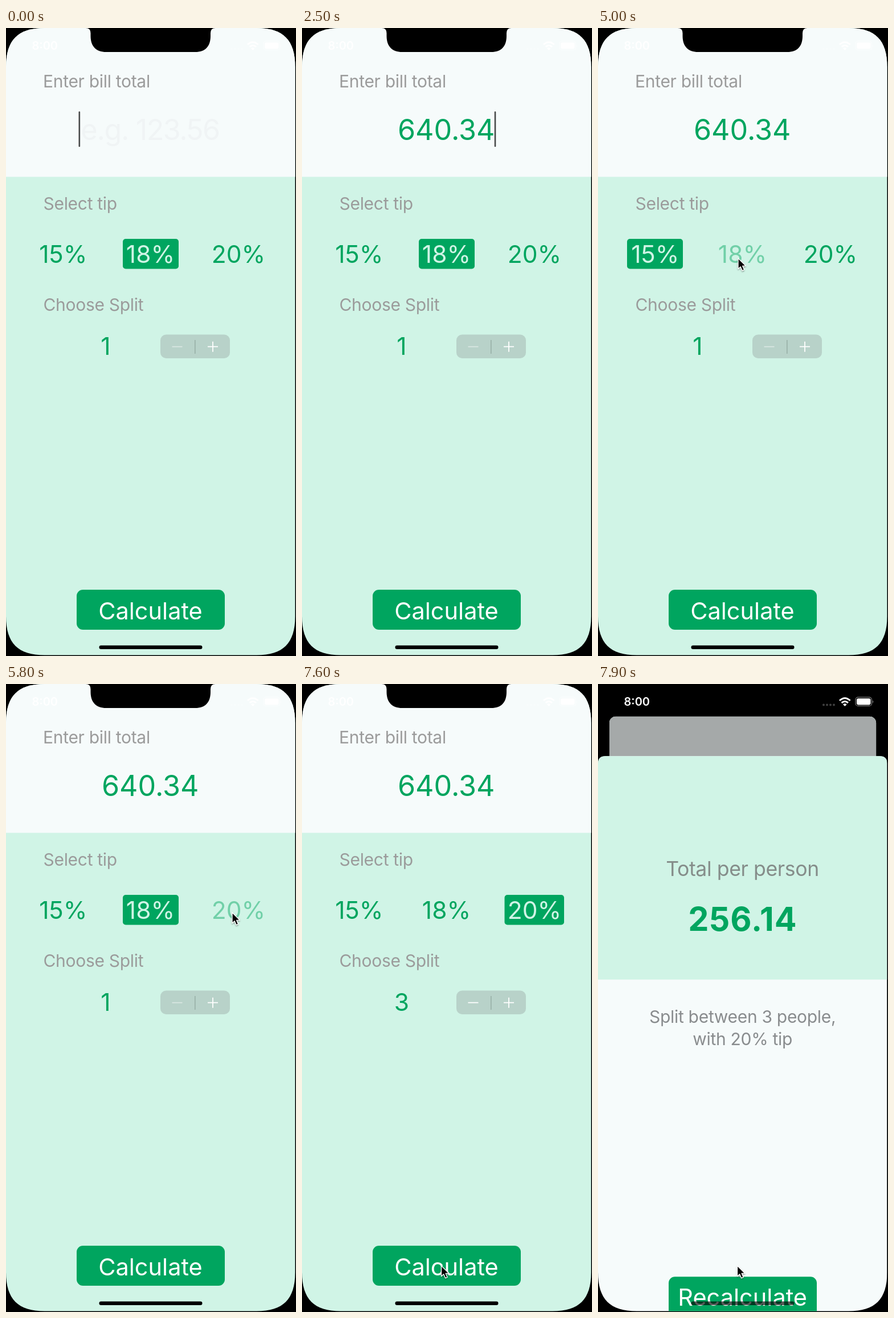
Recreate the animation shown at these times as an HTML page. Size 509 px wide and 1099 px high, loop 8000 ms.

```html
<!DOCTYPE html>
<html lang="en">
<head>
<meta charset="utf-8">
<title>Tip calculator</title>
<style>
  html, body { margin: 0; width: 100%; height: 100%; overflow: hidden; background: #000; }
  svg { display: block; width: 100%; height: 100%; }
  text { font-family: Inter, Roboto, sans-serif; font-optical-sizing: none; }
  .mid { text-anchor: middle; }
  .label { font-size: 30px; letter-spacing: -.3px; fill: #9b9b9b; }
  .big { font-size: 42.5px; fill: #00a55f; }
  .bill { font-size: 50.2px; fill: #00a55f; }
  .hint { fill: #f0f4f5; letter-spacing: -1.4px; }
  .action { font-size: 41.5px; fill: #fff; }
  .green { fill: #00a55f; }
  .mint { fill: #d0f4e6; }
  .pale { fill: #f6fbfb; }
  .sheet-label { font-size: 35.6px; letter-spacing: -.4px; fill: #858d8a; }
  .note { fill: #898c8e; }
  .total { font-size: 57.5px; font-weight: 700; letter-spacing: 1px; }
  .clock { font-size: 20px; font-weight: 600; fill: #fff; }
  .sign { stroke: #fff; stroke-width: 1.8; }
  .tip.on text { fill: #d0f4e6; }
  .tip:not(.on) rect { visibility: hidden; }
  .tip.down text { opacity: .45; }
</style>
</head>
<body>
<svg viewBox="0 0 509 1099" preserveAspectRatio="none">
  <defs>
    <clipPath id="device">
      <path d="M0 68C0 21 21 0 68 0H439.5C486.5 0 507.5 21 507.5 68V1029.5C507.5 1076.5 486.5 1097.5 439.5 1097.5H68C21 1097.5 0 1076.5 0 1029.5Z"/>
    </clipPath>
    <clipPath id="pageClip"><rect id="pageShape" width="508" height="1098"/></clipPath>
    <filter id="shadow" x="-50%" y="-50%" width="200%" height="200%">
      <feDropShadow dx="0" dy="1.5" stdDeviation="1.2" flood-opacity=".4"/>
    </filter>
  </defs>
  <rect width="509" height="1099"/>
  <g clip-path="url(#device)">
    <g id="page"><g clip-path="url(#pageClip)">
      <rect class="mint" width="509" height="1099"/>
      <rect class="pale" width="509" height="260.5"/>
      <text class="label" x="65" y="104">Enter bill total</text>
      <text class="bill hint mid" id="hint" x="253.2" y="196">e.g. 123.56</text>
      <text class="bill mid" id="bill" x="253.2" y="196"></text>
      <rect id="caret" y="146" width="2.6" height="62" rx="1" fill="#484a4a"/>

      <text class="label" x="65.5" y="317.5">Select tip</text>
      <g class="tip"><rect class="green" x="51" y="369" width="98" height="52.5" rx="5"/><text class="big mid" x="100.3" y="411">15%</text></g>
      <g class="tip"><rect class="green" x="205" y="369" width="98" height="52.5" rx="5"/><text class="big mid" x="253.5" y="411">18%</text></g>
      <g class="tip"><rect class="green" x="355.5" y="369" width="104.5" height="52.5" rx="5"/><text class="big mid" x="408" y="411">20%</text></g>

      <text class="label" x="65.5" y="494.5">Choose Split</text>
      <text class="big mid" id="split" x="175" y="572">1</text>
      <rect x="271" y="536.5" width="122" height="41.5" rx="10" fill="#b8d2c9"/>
      <rect id="plusDown" x="331" y="536.5" width="62" height="41.5" rx="10" fill="#7b8783"/>
      <path id="divider" d="M331.8 546V570" stroke="#93aaa1" stroke-width="1.4"/>
      <path id="minus" class="sign" d="M291.5 557.7H309.5"/>
      <path class="sign" d="M354 557.7H372M363 548.7V566.7"/>

      <rect class="green" x="124" y="983" width="260" height="70" rx="11"/>
      <text class="action mid" id="calculate" x="253.5" y="1034.5">Calculate</text>
      <rect id="dim" width="509" height="1099" opacity=".33"/>
    </g></g>

    <g fill="#fff">
      <text class="clock mid" x="68.3" y="38">8:00</text>
      <g opacity=".25"><circle cx="396" cy="36.5" r="2"/><circle cx="402" cy="36.5" r="2"/><circle cx="408" cy="36.5" r="2"/><circle cx="414" cy="36.5" r="2"/></g>
      <path d="M424 29Q433.3 20.5 442.6 29M427.6 33Q433.3 28 439 33" fill="none" stroke="#fff" stroke-width="3"/>
      <path d="M433.3 39L430 35.7Q433.3 33 436.6 35.7Z"/>
      <rect x="452" y="23.2" width="28.5" height="15.2" rx="4.5" fill="none" stroke="#fff" stroke-opacity=".5" stroke-width="1.2"/>
      <rect x="454" y="25.2" width="24.5" height="11.2" rx="2.8"/>
      <path d="M482 28.5Q484.6 31 482 33.5Z" opacity=".5"/>
    </g>

    <g id="sheet">
      <path class="pale" d="M0 1100V13Q0 0 13 0H494.5Q507.5 0 507.5 13V1100Z"/>
      <path class="mint" d="M0 391V13Q0 0 13 0H494.5Q507.5 0 507.5 13V391Z"/>
      <text class="sheet-label mid" x="253.5" y="209.5">Total per person</text>
      <text class="total green mid" x="254" y="305.5">256.14</text>
      <text class="label note mid" x="253.7" y="466.5">Split between 3 people,</text>
      <text class="label note mid" x="253.7" y="505.5">with 20% tip</text>
      <rect class="green" x="124" y="911" width="260" height="70" rx="11"/>
      <text class="action mid" x="253.7" y="962">Recalculate</text>
    </g>
    <rect id="homeBar" x="163.5" y="1080.5" width="181" height="6.5" rx="3.2"/>
  </g>
  <path d="M140 0Q148.5 0 148.5 9V14C148.5 32 158 42 176 42H332C350 42 359 32 359 14V9Q359 0 367.5 0Z"/>
  <path id="pointer" filter="url(#shadow)" d="M0 0V18.6L4.2 14.7L7.2 21.7L10.6 20.2L7.7 13.4H13.3Z" stroke="#fff" stroke-width="1.3" stroke-linejoin="round"/>
</svg>
<script>
  const LOOP = 8000, STEP = 100, SHEET_START = 7647.3;
  const $ = id => document.getElementById(id);
  const tips = document.querySelectorAll('.tip');
  const typed = '640.34';
  const keyTimes = [600, 900, 1200, 1500, 1900, 2200];
  const caretOff = [[200, 500], [2800, 3200], [3800, LOOP]];
  const tipTaps = [[4300, 0], [5000, 1], [5800, 2]];
  const splitTaps = [6700, 7000];
  // time, x, y
  const route = [
    [3300, 235, 320], [3900, 113.5, 405], [4500, 113.5, 405], [4900, 246, 403],
    [5300, 246, 403], [5700, 397, 400], [6100, 397, 400], [6500, 378, 548],
    [7100, 378, 548], [7450, 244.5, 1018]
  ];

  const within = (t, from, to) => t >= from && t < to;
  const show = (node, on) => node.setAttribute('visibility', on ? 'visible' : 'hidden');
  const smooth = u => u * u * (3 - 2 * u);

  function pointerAt(t) {
    const next = route.findIndex(p => p[0] > t);
    if (next < 0) return route[route.length - 1].slice(1);
    const a = route[Math.max(next - 1, 0)], b = route[next];
    const u = a === b ? 0 : smooth((t - a[0]) / (b[0] - a[0]));
    return [a[1] + (b[1] - a[1]) * u, a[2] + (b[2] - a[2]) * u];
  }

  // critically damped spring
  function sheetProgress(t) {
    const w = Math.max(0, t - SHEET_START) / 1000 * 18.26;
    return 1 - (1 + w) * Math.exp(-w);
  }

  function drawForm(t) {
    const count = keyTimes.filter(k => t >= k).length;
    $('bill').textContent = typed.slice(0, count);
    show($('hint'), count === 0);
    show($('caret'), !caretOff.some(([a, b]) => within(t, a, b)));
    $('caret').setAttribute('x', count ? 252.5 + $('bill').getComputedTextLength() / 2 : 127.5);

    let chosen = 1;
    for (const [at, index] of tipTaps) if (t >= at + STEP) chosen = index;
    tips.forEach((tip, i) => {
      tip.classList.toggle('on', i === chosen);
      tip.classList.toggle('down', tipTaps.some(([at, index]) => index === i && within(t, at, at + STEP)));
    });

    const people = 1 + splitTaps.filter(at => t >= at).length;
    const pressed = splitTaps.some(at => within(t, at, at + 2 * STEP));
    $('split').textContent = people;
    $('minus').setAttribute('opacity', people > 1 ? 1 : .45);
    show($('plusDown'), pressed);
    show($('divider'), !pressed);
    $('calculate').setAttribute('opacity', within(t, 7500, 7600) ? .45 : 1);
  }

  function drawSheet(t) {
    const p = sheetProgress(t), scale = 1 - .083 * p;
    $('page').setAttribute('transform', `translate(${254 * (1 - scale)} ${60 * p}) scale(${scale})`);
    $('pageShape').setAttribute('rx', p > 0 ? 56 - 46 * p : 0);
    show($('dim'), p > 0);
    show($('sheet'), p > 0);
    $('sheet').setAttribute('transform', `translate(0 ${1099 - 1030 * p})`);
    $('homeBar').setAttribute('opacity', p > 0 ? .65 : 1);
  }

  function frame(now) {
    const t = Math.floor(now % LOOP / STEP) * STEP;
    drawForm(t);
    drawSheet(t);
    show($('pointer'), t >= route[0][0]);
    $('pointer').setAttribute('transform', `translate(${pointerAt(t)})`);
    requestAnimationFrame(() => frame(performance.now() - start));
  }
  const start = performance.now();
  frame(0);
</script>
</body>
</html>
```
